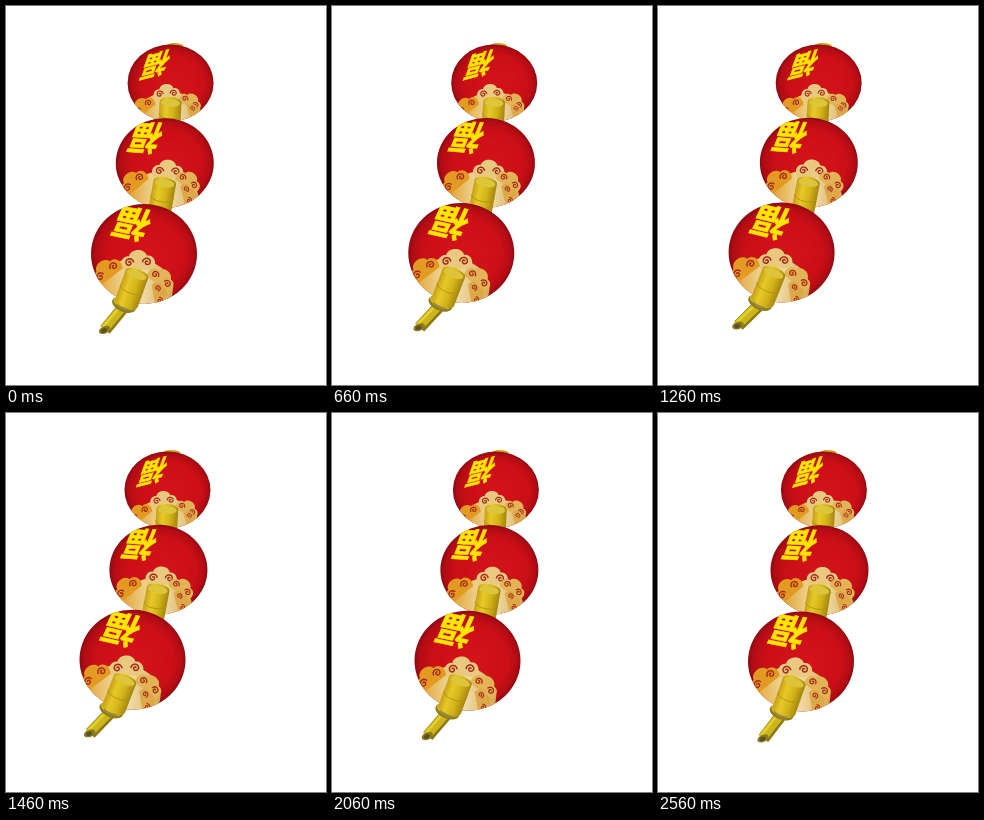
Write an HTML page that moves like this. It is 320 px wide and 379 px high and loops after 2660 ms.

```html
<!DOCTYPE html>
<html lang="zh">
<head>
<meta charset="utf-8">
<title>Swaying lanterns</title>
<style>
  html, body { margin: 0; width: 100%; height: 100%; overflow: hidden; background: #fff; }
  svg { display: block; width: 320px; height: 379px; }
  text { font: 900 10px "Noto Sans CJK SC", "Noto Sans CJK", sans-serif; text-anchor: middle; }
</style>
</head>
<body>
<svg id="stage" viewBox="0 0 320 379">
  <defs>
    <radialGradient id="red" cx=".5" cy=".5" r=".5" fx=".58" fy=".5">
      <stop offset="0" stop-color="#d4131a"/>
      <stop offset=".72" stop-color="#cb0f17"/>
      <stop offset=".92" stop-color="#b30c14"/>
      <stop offset="1" stop-color="#8e0a10"/>
    </radialGradient>
    <linearGradient id="cream">
      <stop offset="0" stop-color="#e2a02c"/>
      <stop offset=".35" stop-color="#ecd08c"/>
      <stop offset=".6" stop-color="#efdcaa"/>
      <stop offset="1" stop-color="#d8a850"/>
    </linearGradient>
    <linearGradient id="gold">
      <stop offset="0" stop-color="#c79f14"/>
      <stop offset=".3" stop-color="#e6c928"/>
      <stop offset=".65" stop-color="#d3b318"/>
      <stop offset="1" stop-color="#a48610"/>
    </linearGradient>
  </defs>
</svg>
<script>
const stage = document.getElementById('stage');

// x, y: rest centre; sway: share of the swing; glyph: x, y, size, matrix
// clouds: x, y, angle, scale, colour
const lanterns = [
  { x: 163.2, y: 77, rx: 43, ry: 38.5, sway: [.27, 0],
    glyph: [-15, -18, 29, '-.92 .24 .36 -1'],
    cap: [-1, 32, 32, 23], tube: [0, 19, 11, 24, 3],
    clouds: [[-4, 8, -4, .78, '#e9c980'], [-29, 22, -38, .75, '#e39a22'],
             [21, 17, 32, .7, '#e3b455'], [25, 30, 75, .6, '#dca848']] },
  { x: 156, y: 157, rx: 49, ry: 45, sway: [.55, .03],
    glyph: [-19, -25, 32, '-.95 -.06 .42 -1.06'],
    cap: [-2, 36, 36, 28], tube: [0, 19, 11.5, 30, 10],
    clouds: [[3, 5, 2, .92, '#e9c980'], [-33, 17, -40, .9, '#e39a22'],
             [25, 16, 35, .78, '#e3b455'], [25, 31, 75, .66, '#dca848']] },
  { x: 133, y: 247.4, rx: 53, ry: 50, sway: [1, .1],
    glyph: [-12, -30, 36, '-.95 -.2 .42 -.95'],
    cap: [-10, 35, 39, 30], tube: [-7, 20, 12, 31, 20],
    clouds: [[-6, 5, -2, 1, '#e9c980'], [-39, 15, -38, .95, '#e39a22'],
             [19, 23, 38, .85, '#e3b455'], [17, 40, 80, .7, '#dca848']] }
];

const spiral = (cx, cy, dir) => {
  let d = '';
  for (let i = 0; i <= 22; i++) {
    const a = i * .42, r = 4.6 - i * .19;
    d += `${i ? 'L' : 'M'}${(cx - dir * r * Math.cos(a)).toFixed(2)} ${(cy - r * Math.sin(a)).toFixed(2)}`;
  }
  return d;
};
const swirls = spiral(-9, 3.5, -1) + spiral(9, 3.5, 1);

const cloud = ([x, y, angle, scale, fill]) => `
  <g transform="translate(${x} ${y}) rotate(${angle}) scale(${scale})">
    <path fill="${fill}" d="M-15 11 C-20 3 -15 -4 -9 -3 C-7 -11 7 -11 9 -3 C15 -4 20 3 15 11 Z"/>
    <path fill="none" stroke="#a82a18" stroke-width="1.5" d="${swirls}"/>
  </g>`;

const tube = ([x, y, w, h, angle]) => `
  <g transform="translate(${x} ${y}) rotate(${angle})">
    <path fill="url(#gold)" d="M${-w} 0 A${w} 5 0 0 1 ${w} 0 V${h} A${w} 5 0 0 1 ${-w} ${h} Z"/>
    <ellipse cy="1" rx="${w * .86}" ry="4" fill="#dcc53a"/>
    <path fill="none" stroke="#b0920f" stroke-width=".8" d="M${-w} ${h * .5} A${w} 5 0 0 0 ${w} ${h * .5}"/>
  </g>`;

const tail = `
  <g id="tail">
    <path d="M-16 48 L-39 76" stroke="#8c7812" stroke-width="12"/>
    <path d="M-17 48 L-40 75.5" stroke="#cdb51c" stroke-width="9"/>
    <path d="M-19 47 L-42 74" stroke="#e3d02c" stroke-width="2.5"/>
    <ellipse cx="-39.5" cy="76" rx="6" ry="3.6" transform="rotate(-25 -39.5 76)" fill="#8a7a1c"/>
    <ellipse cx="-40" cy="76.5" rx="3" ry="2" transform="rotate(-25 -40 76.5)" fill="#5a5024"/>
  </g>`;

const collar = `
  <g transform="translate(-20 51) rotate(22)">
    <ellipse rx="12.5" ry="7" fill="#8f7c1e"/>
    <ellipse cy="-1.5" rx="11.5" ry="5.5" fill="#d2b826"/>
    <ellipse cy="1" rx="7.5" ry="3.8" fill="#9c8a3a"/>
  </g>`;

const lantern = (l, i) => {
  const [gx, gy, size, matrix] = l.glyph;
  const [cx, cy, cw, ch] = l.cap;
  const last = i === 2;
  return `<g class="lantern">
    ${i ? '' : '<ellipse cx="4" cy="-37" rx="9" ry="3" fill="#d0a51c"/>'}
    <clipPath id="clip${i}"><ellipse rx="${l.rx}" ry="${l.ry}"/></clipPath>
    <ellipse rx="${l.rx}" ry="${l.ry}" fill="url(#red)"/>
    <g clip-path="url(#clip${i})">
      <ellipse cx="${cx}" cy="${cy}" rx="${cw}" ry="${ch}" fill="url(#cream)"/>
      ${l.clouds.map(cloud).join('')}
      <g transform="matrix(${matrix} ${gx} ${gy})">
        <text y="${size * .38}" style="font-size:${size}px" fill="#ffe600" stroke="#ffe600" stroke-width=".5">福</text>
      </g>
    </g>
    ${last ? tail + collar : ''}
    ${tube(l.tube)}
  </g>`;
};

stage.insertAdjacentHTML('beforeend', lanterns.map(lantern).join(''));
const groups = [...document.querySelectorAll('.lantern')];
const tailGroup = document.getElementById('tail');

// step, swing of the lowest lantern in px
const swing = [[0, 5], [12, -10], [13, -9.4], [15, -6.5], [26, 10]];
const swingAt = step => {
  const k = Math.max(1, swing.findIndex(([s]) => s >= step));
  const [s0, v0] = swing[k - 1], [s1, v1] = swing[k];
  return v0 + (v1 - v0) * (step - s0) / (s1 - s0);
};

const LOOP = 2660, FIRST = 60, STEP = 100;
const start = performance.now();

function draw(now) {
  const t = Math.max(0, now - start) % LOOP;
  const d = swingAt(t < FIRST ? 0 : 1 + Math.floor((t - FIRST) / STEP));
  lanterns.forEach((l, i) => {
    const x = l.x + d * l.sway[0], y = l.y + d * l.sway[1];
    groups[i].setAttribute('transform', `translate(${x} ${y}) rotate(${(5 - d) * .12 * l.sway[0]})`);
  });
  tailGroup.setAttribute('transform', `rotate(${(5 - d) * .3} -18 50)`);
  requestAnimationFrame(draw);
}
draw(start);
</script>
</body>
</html>
```
